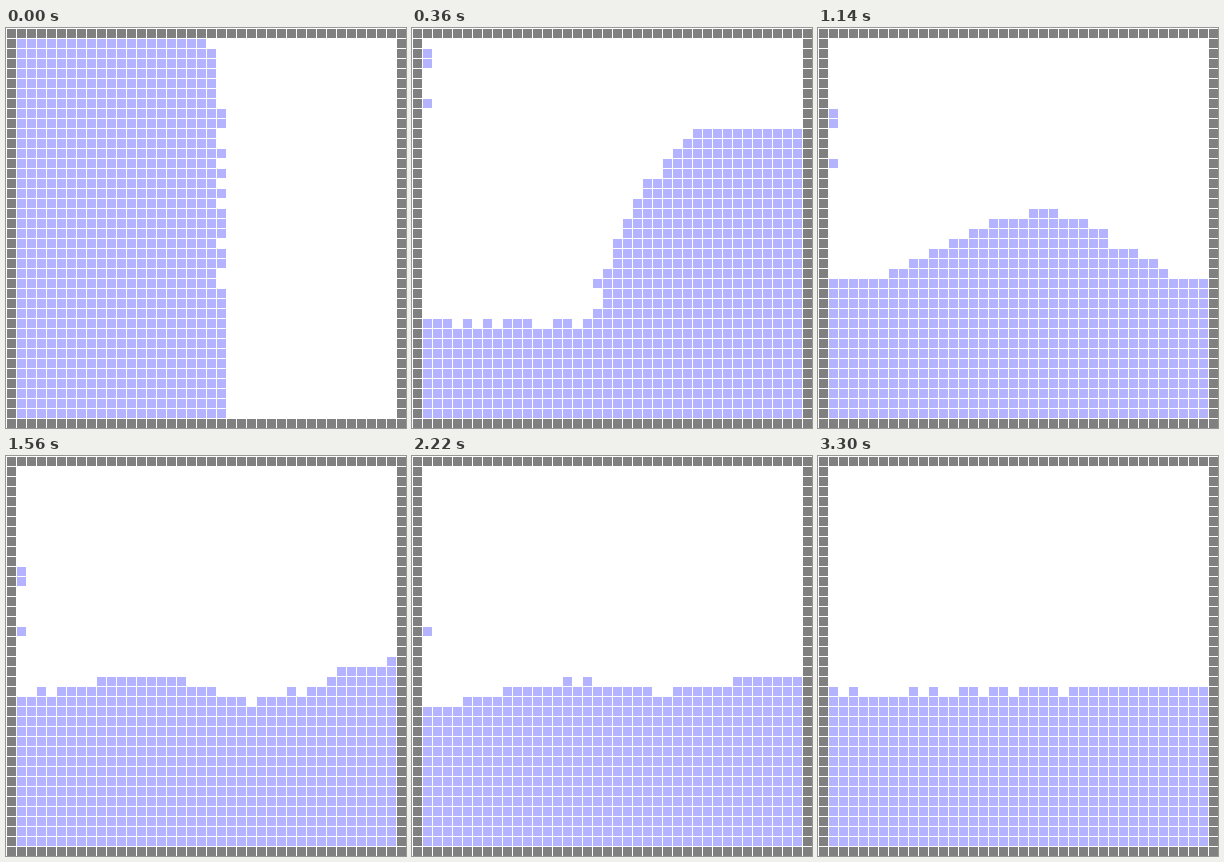
These frames come from a looping animation (400 by 400 pixels, 3.36 s). A matplotlib script:

```python
import numpy as np
import matplotlib.pyplot as plt
from matplotlib.animation import FuncAnimation

FRAMES, INTERVAL = 56, 60
N, CELL = 40, 10
SIZE = N - 2  # cells across the tank
WHITE, WALL, WATER = (255, 255, 255), (128, 128, 128), (179, 179, 255)
PALETTE = np.array([WHITE, WALL, WATER], dtype=np.uint8)

rng = np.random.default_rng(4)
RIPPLE = rng.uniform(-0.4, 0.4, SIZE)
JITTER = rng.uniform(-0.5, 0.5, (SIZE, 1))
X = np.clip(np.arange(SIZE) + 0.5 + JITTER, 0, SIZE)
LEVEL = np.arange(SIZE, 0, -1)[:, None]

IMPACT, SETTLED = 6, 12  # the surge peaks, then becomes plain sloshing
SHALLOW, SURGE = 9.5, 19.5
VOLUME = 795


def collapse(t):
    """Falling column spreading right, then piling up on the right wall."""
    t = min(t, IMPACT)
    height = SIZE - (SIZE - SHALLOW) * (t / IMPACT) ** 1.2
    front = 21 + 5.5 * t
    fill = min(VOLUME / (height * front), 0.98)
    column = height * (1 - np.clip(X / front, 0, 1) ** (fill / (1 - fill)))
    grow = np.clip((t - 2.5) / 3.5, 0, 1)
    edge = 17.5 + 18 * (1 - grow)
    return column + SURGE * grow * np.sqrt(np.clip((X - edge) / 10, 0, 1))


def mode(k, t, size, decay, period, peak):
    """Standing wave with k half waves across the tank."""
    swing = size * np.exp((13 - t) / decay) * np.cos(2 * np.pi * (t - peak) / period)
    return swing * np.cos(k * np.pi * X / SIZE)


def slosh(t):
    mean = 15.5 + 2.5 * np.exp((13 - t) / 10)
    return (mean
            + mode(1, t, size=4.8, decay=16.5, period=16, peak=14.5)
            + mode(2, t, size=6.5, decay=9, period=9.8, peak=14.3)
            + mode(3, t, size=2.6, decay=20, period=10.5, peak=21))


def surface(t):
    if t <= IMPACT:
        return collapse(t)
    mix = min((t - IMPACT) / (SETTLED - IMPACT), 1)
    return collapse(t) * (1 - mix) + slosh(t) * mix


def drops(t):
    """Rows of the drops sliding down the left wall."""
    for start, last in ((2.25, FRAMES), (3.25, 32), (7.45, 32)):
        row = int(max(1, start + 0.48 * (t - IMPACT)))
        if t < last and row <= SIZE:
            yield row


def picture(t):
    grid = np.ones((N, N), dtype=int)
    grid[1:-1, 1:-1] = np.where(surface(t) + RIPPLE >= LEVEL - 0.5, 2, 0)
    grid[list(drops(t)), 1] = 2
    pixels = PALETTE[grid].repeat(CELL, axis=0).repeat(CELL, axis=1)
    pixels[::CELL] = WHITE
    pixels[:, ::CELL] = WHITE
    return pixels


fig = plt.figure(figsize=(4, 4), dpi=100, facecolor="white")
ax = fig.add_axes([0, 0, 1, 1])
ax.axis("off")
image = ax.imshow(picture(0), interpolation="nearest", aspect="auto")


def update(t):
    image.set_data(picture(t))
    return [image]


anim = FuncAnimation(fig, update, frames=FRAMES, interval=INTERVAL,
                     repeat=True, repeat_delay=0)
plt.show()
```
